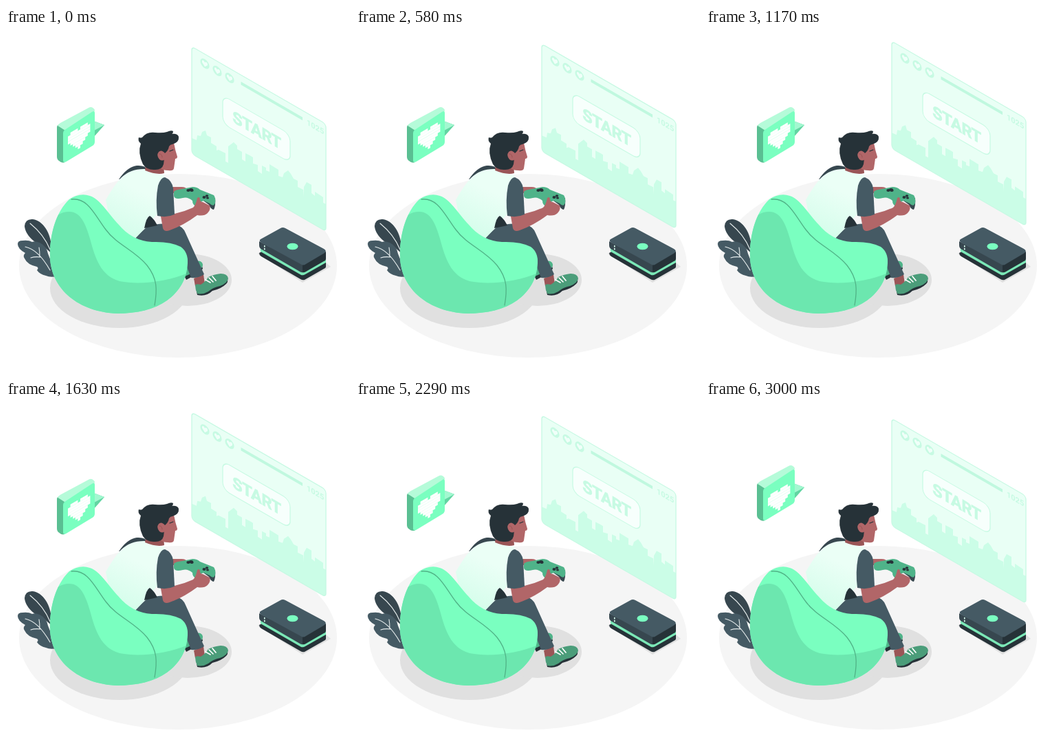
Animation of 500x500 px, one loop 3040 ms. Source, as an HTML page:

```html
<!DOCTYPE html>
<html lang="en">
<head>
<meta charset="utf-8">
<title>Gamer</title>
<style>
html, body { margin: 0; width: 100%; height: 100%; overflow: hidden; background: #fff; }
svg { display: block; width: 100vw; height: 100vh; }
text { font-family: Roboto, Inter, sans-serif; font-weight: 700; fill: #c7fae3; }
.mint { fill: #7affc0; }
.slate { fill: #455a64; }
.deep { fill: #37474f; }
.ink { fill: #263238; }
.skin { fill: #b16668; }
.shade { fill: #9a5557; }
.pad { fill: #4fb389; }
.line { fill: none; stroke-linecap: round; stroke-linejoin: round; }
</style>
</head>
<body>
<svg viewBox="0 0 500 500">
  <defs>
    <linearGradient id="shirt" x1="0.7" y1="0" x2="0.3" y2="1">
      <stop offset="0.3" stop-color="#ebfff6"/><stop offset="1" stop-color="#d3fdea"/>
    </linearGradient>
    <clipPath id="panel"><rect width="195" height="156" rx="5"/></clipPath>
    <clipPath id="bagShape"><use href="#bag"/></clipPath>
  </defs>

  <ellipse cx="250" cy="345.5" rx="231" ry="133.5" fill="#f5f5f5"/>
  <g fill="#e0e0e0">
    <ellipse cx="165" cy="378" rx="101" ry="58"/>
    <ellipse cx="264" cy="366" rx="64" ry="38"/>
    <path d="M366 328L431 370L472 347L465 341L400 306Z"/>
  </g>

  <!-- floating game screen, drawn flat and skewed -->
  <g id="screen">
    <g transform="matrix(1 .577 0 1 270 27)">
      <rect width="195" height="156" rx="5" fill="#e9fff5"/>
      <g clip-path="url(#panel)">
        <path transform="matrix(1 -.577 0 1 0 0) translate(-270 -27)" fill="#cbfde7" d="M270 160L277 163L278 156L283 157L285 151L290 149L292 156L298 159V167L306 172V178L309 177L319 182V194L323 196V172L331 166L336 171V176L343 180V191L348 194V182L354 185L359 188V197L366 199V208L372 212V200L378 203V207L383 209V198L396 206V215L402 217L404 211L410 207L414 212L418 219L424 222V231L432 235V246L433 231L437 224L444 228V240L449 244V238L461 246V254L465 256V300L270 190Z"/>
      </g>
      <rect width="195" height="156" rx="5" fill="none" stroke="#c6f9e3" stroke-width="1.3"/>
      <g id="lives"></g>
      <path d="M71.500 12H161" stroke="#c0f8df" stroke-width="4.500"/>
      <text x="167" y="17" font-size="11">1025</text>
      <rect x="45" y="45" width="98" height="41" rx="10" fill="#f7fffc" stroke="#c7fae3" stroke-width="1.200"/>
      <text x="94.500" y="75" font-size="23.500" text-anchor="middle" font-weight="900" letter-spacing="-.4" stroke="#c7fae3" stroke-width=".7">START</text>
    </g>
  </g>

  <!-- speech bubble -->
  <g id="tail">
    <path d="M127 135L143 141L128 158Z" fill="#61d5a2"/>
    <path d="M127 135L143 141L128 149Z" fill="#a2f8d0"/>
  </g>
  <g id="bubble">
    <path d="M74 144Q74 141 78 140L86 147V195Q81 197 77 193Q74 191 74 187Z" fill="#5abf92"/>
    <path d="M75 142Q76 140 79 138L120 116Q125 113 129 119L128 123L86 149Q80 145 75 142Z" fill="#b5fbd9"/>
    <path d="M83 153Q83 149 87 147L125 122Q129 119 129 124V165Q129 169 126 171L88 194Q83 197 83 192Z" class="mint"/>
  </g>
  <g id="heart" fill="#fff"></g>

  <!-- console -->
  <path class="ink" d="M368 327L402 310L465 341V347Q465 349 462 350L434 366Q431 367 428 365L371 332Q368 330 368 327Z"/>
  <path d="M370 320V325L429 359Q432 360 435 358L465 341V336L432 351Z" fill="#7be8b7"/>
  <path class="deep" d="M368 310L432 344V355Q430 356 427 354L372 322Q368 320 368 316Z"/>
  <path class="ink" d="M431 343L465 325V335Q465 338 462 339L436 354Q433 356 431 355Z"/>
  <path class="slate" d="M370 307L399 291Q402 289 406 291L462 321Q467 324 463 327L436 343Q432 346 428 343L371 312Q367 309 370 307Z"/>
  <ellipse class="mint" cx="416.500" cy="317.500" rx="8" ry="4.800"/>
  <path class="line" d="M375.800 316.700v1M375.800 320.700v1" stroke="#d9fff0" stroke-width="1.700"/>

  <!-- plant -->
  <path class="deep" d="M72 333Q59 321 55 318C40 312 28 300 27 288Q28 277 39 278C54 280 65 298 66 318Z"/>
  <path class="slate" d="M17 314Q17 309 24 309Q33 308 38 311Q42 309 49 312Q59 317 61 328L74 361Q64 363 58 360Q49 358 45 352Q48 349 45 347Q31 344 27 335Q24 331 28 327Q17 321 17 314Z"/>
  <path class="line" d="M35 284Q55 300 64 322M28 318Q47 322 64 352M49 332Q49 324 48 319M50 333Q42 332 36 334" stroke="#e8eeee" stroke-width="1.100"/>

  <!-- far foot and far arm -->
  <path class="ink" d="M258 358L285 346L286 350Q278 358 262 366Z"/>
  <path class="pad" d="M258 345L274 341Q281 336 285 341Q288 346 282 351L260 361Z"/>
  <path class="deep" d="M164 220Q176 202 190 200Q202 199 206 206L180 216Z"/>
  <path class="skin" d="M238 231Q247 231 255 231Q262 231 263 235Q259 239 251 238L240 241Z"/>

  <!-- legs -->
  <path class="shade" d="M273 364L287 358L289 372Q282 379 275 375Z"/>
  <path class="slate" d="M184 308L206 288Q225 282 247 286Q257 288 261 298L288 358Q280 364 269 363L257 332L235 318Z"/>

  <!-- torso -->
  <path fill="url(#shirt)" d="M145 250Q156 230 167 218Q181 204 203 205Q215 212 231 214L224 230L220 270L203 290L186 308L150 275Z"/>
  <path class="ink" d="M201 291Q204 275 209 273Q215 277 220 287Z"/>

  <!-- head -->
  <path class="shade" d="M203 201L229 199L230 211Q219 214 202 207Z"/>
  <path class="skin" d="M224 174L244 167Q246 178 249 187Q249 190 246 190L244 204Q243 208 236 207Q227 207 223 202Z"/>
  <path class="ink" d="M196 168Q191 164 193 159Q196 160 198 159Q205 150 217 152Q228 153 234 151Q240 148 243 150Q243 153 241 154Q249 153 251 158Q252 166 242 169Q239 169 237 172Q236 178 231 182L229 198Q227 206 217 206Q205 207 199 198Q191 181 196 168Z"/>
  <path class="skin" d="M231 182Q226 176 222 180Q218 185 223 191Q227 194 231 191Z"/>
  <path class="line" d="M223 183Q227 183 227 188" stroke="#9a5557" stroke-width="1"/>
  <path class="line" d="M238 179L243 177" stroke="#263238" stroke-width="1.200"/>

  <!-- controller -->
  <path class="deep" d="M280 246L304 247Q305 258 302 264Q298 264 295 257Z"/>
  <path class="pad" d="M244 238Q246 235 256 234L271 231Q278 231 282 235L302 243Q305 247 304 254Q302 261 296 255L287 251Q280 254 276 259Q271 257 271 251Q264 245 257 247Q245 250 244 244Z"/>
  <g class="ink">
    <ellipse cx="265" cy="236" rx="2.700" ry="2"/><ellipse cx="270" cy="236" rx="2.700" ry="2"/>
    <ellipse cx="269" cy="235" rx="3" ry="2"/>
    <ellipse cx="288" cy="246" rx="2.500" ry="2"/><ellipse cx="292" cy="244" rx="2.200" ry="1.700"/>
    <ellipse cx="293" cy="247" rx="2" ry="1.600"/>
  </g>

  <!-- near arm -->
  <path class="skin" d="M224 268L245 270Q259 267 272 261Q276 257 278 247Q282 244 282 250Q283 253 286 253L296 258Q298 264 293 269Q288 274 278 272Q258 287 238 294Q230 297 228 291Z"/>
  <path class="slate" d="M221 229Q225 217 231 217Q241 221 243 233L245 271Q234 276 220 273Q217 250 221 229Z"/>

  <!-- near shoe -->
  <path class="ink" d="M276 378L278 388Q291 391 300 382Q313 379 320 372Q323 369 322 364Z"/>
  <path d="M275 374Q276 371 283 373Q290 369 294 362Q302 358 312 357Q322 357 323 364Q322 371 311 375Q301 377 294 383Q286 388 278 386Q275 380 275 374Z" fill="#4b9d7a"/>
  <path class="line" d="M290 366L297 370M295 363L301 369M300 361L305 367" stroke="#fff" stroke-width="1.700"/>

  <!-- beanbag -->
  <path id="bag" class="mint" d="M64 334C63 300 73 267 92 249Q107 239 122 244C137 249 148 269 164 286Q183 309 212 311Q239 310 254 318Q265 326 264 342C263 365 252 383 234 396C216 409 190 415 162 415C106 413 66 380 64 334Z"/>
  <path clip-path="url(#bagShape)" d="M60 290Q72 267 92 267C109 267 116 286 122 306C130 336 138 360 165 368C195 374 236 369 270 354V425H55Z" fill="#6ce7af"/>
  <path class="line" d="M95 249C119 246 129 272 145 293C161 315 187 323 205 345C220 364 220 380 216 403" stroke="#50b286" stroke-width="1.300"/>
</svg>
<script>
const $ = id => document.getElementById(id);
const shift = (id, y) => $(id).setAttribute("transform", `translate(0 ${y})`);

$("lives").innerHTML = [19, 37, 55].map(x =>
  `<g transform="translate(${x} 14)"><circle r="6.600" fill="#c7fae3"/>
   <path d="M0 4.300L-4 0Q-4.500-3.800-1.700-3.500L0-2L1.700-3.500Q4.500-3.800 4 0Z" fill="#f0fff9"/></g>`).join("");

// pixel heart: [first column, width] for each run
const runs = [[[1, 3], [5, 3]], [[0, 9]], [[0, 9]], [[0, 9]], [[1, 7]], [[2, 5]], [[3, 3]], [[4, 1]]];
$("heart").innerHTML = `<g transform="matrix(3.600 -2.080 0 3.800 90 154)">` +
  runs.map((row, y) => row.map(([x, w]) =>
    `<rect x="${x}" y="${y}" width="${w}" height="1.050"/>`).join("")).join("") + "</g>";

function draw(now) {
  const p = Math.min(now % 3040 / 3000, 1);
  shift("screen", -10 * (1 - Math.abs(2 * p - 1)));
  const rise = Math.max(0, 2 * p - 1) ** 2;
  shift("bubble", -20 * rise);
  shift("heart", -15 * rise);
  shift("tail", -14 * rise);
}

const start = performance.now();
function tick() {
  draw(performance.now() - start);
  requestAnimationFrame(tick);
}
tick();
</script>
</body>
</html>
```
